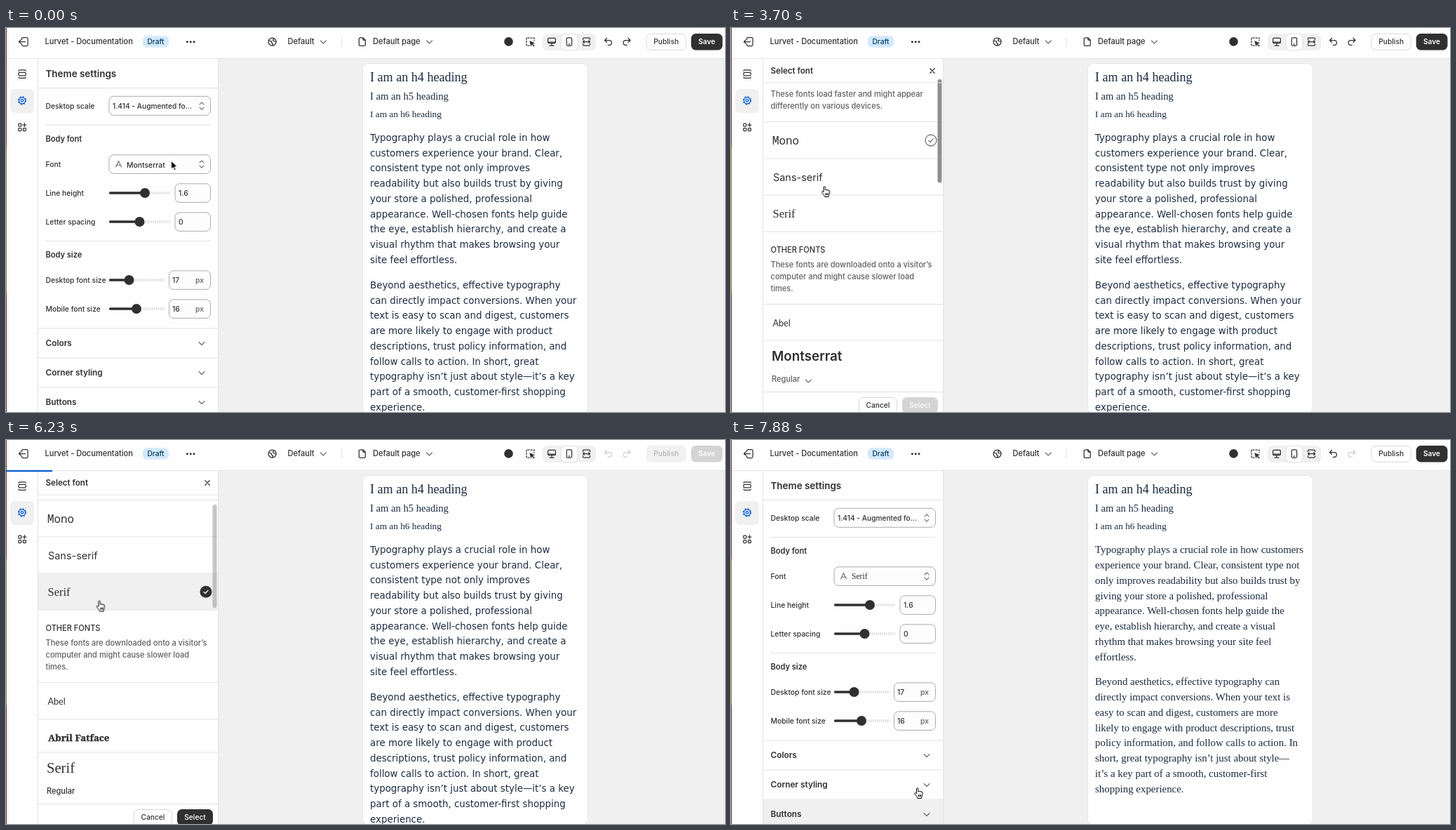
Write an HTML page that moves like this. It is 1025 by 547 pixels and loops after 8000 ms.

```html
<!DOCTYPE html>
<html lang="en">
<head>
<meta charset="utf-8">
<title>Theme editor</title>
<style>
html, body { margin: 0; width: 100%; height: 100%; overflow: hidden; background: #fff; }
svg { display: block; width: 1025px; height: 547px; }
text { font: 450 11.05px Inter, sans-serif; fill: #303030; white-space: pre; }
.label { font-size: 10.35px; }
.small { font-size: 10.2px; font-weight: 500; }
.btn { font-size: 10.2px; font-weight: 550; text-anchor: middle; }
.bold { font-weight: 600; }
.row { font-size: 11.8px; font-weight: 600; }
.title { font-size: 13.45px; font-weight: 600; }
.mid { font-weight: 500; }
.sub { fill: #616161; }
.serif { font-family: "Liberation Serif", serif; font-weight: 400; }
.page text { fill: #1d2c40; }
.body { font: 13.4px "DejaVu Sans", sans-serif; }
.body.serif { font: 14.9px "Liberation Serif", serif; }
.icon { fill: none; stroke: #303030; stroke-width: 1.25; stroke-linecap: round; stroke-linejoin: round; }
.chev { stroke: #6a6a6a; stroke-width: 1.1; }
.field { fill: #fdfdfd; stroke: #a3a3a3; stroke-width: .9; }
.line { stroke: #e3e3e3; stroke-width: 1; }
.track { stroke: #dadada; stroke-width: 4; stroke-dasharray: 1.3 1.5; }
.fill { stroke: #303030; stroke-width: 3.4; stroke-linecap: round; }
.knob { fill: #303030; }

/* hard changes */
.cut { animation: 8s step-end infinite; }
.settings { animation-name: settings; }
.picker { animation-name: picker; }
.before { animation-name: before; }
.chosen { animation-name: chosen; }
.busy { animation-name: busy; }
.undo { animation-name: undo; }
.redo { animation-name: redo; }
.old { animation-name: old; }
.new { animation-name: new; }
.pageBar { animation-name: pageBar; }
.press { animation-name: press; }
.hover { animation-name: hover; }
.monoTick { animation-name: monoTick; }
.serifTick { animation-name: serifTick; }
.arrow { animation-name: arrow; }
.hand { animation-name: hand; }
.wasFont { animation-name: wasFont; }
.nowFont { animation-name: nowFont; }
@keyframes settings { 0% { opacity: 1 } 14.75% { opacity: 0 } 92.875% { opacity: 1 } }
@keyframes picker { 0% { opacity: 0 } 14.75% { opacity: 1 } 92.875% { opacity: 0 } }
@keyframes before { 0% { opacity: 1 } 68.5% { opacity: 0 } }
@keyframes chosen { 0% { opacity: 0 } 68.5% { opacity: 1 } }
@keyframes busy { 0% { opacity: 0 } 70.375% { opacity: 1 } 96.625% { opacity: 0 } }
@keyframes undo { 0% { stroke: #303030 } 70.375% { stroke: #cfcfcf } 96.625% { stroke: #303030 } }
@keyframes redo { 0% { stroke: #303030 } 70.375% { stroke: #cfcfcf } }
@keyframes old { 0% { opacity: 1 } 85.375% { opacity: 0 } }
@keyframes new { 0% { opacity: 0 } 85.375% { opacity: 1 } }
@keyframes pageBar { 0% { opacity: 0 } 85.375% { opacity: 1 } 94.7% { opacity: 0 } }
@keyframes press { 0% { fill: #303030 } 87.25% { fill: #1a1a1a } }
@keyframes hover { 0% { opacity: 0 } 92.875% { opacity: 1 } }
@keyframes monoTick { 0% { opacity: 0 } 27.625% { opacity: 1 } 53.6% { opacity: 0 } }
@keyframes serifTick { 0% { opacity: 0 } 53.6% { opacity: 1 } 68.5% { opacity: 0 } }
@keyframes arrow { 0% { opacity: 1 } 3.625% { opacity: 0 } 20.25% { opacity: 1 } 25.85% { opacity: 0 } }
@keyframes hand { 0% { opacity: 0 } 3.625% { opacity: 1 } 20.25% { opacity: 0 } 25.85% { opacity: 1 } }
@keyframes wasFont { 0% { opacity: 1 } 50% { opacity: 0 } }
@keyframes nowFont { 0% { opacity: 0 } 50% { opacity: 1 } }

/* motion, about seven poses a second */
.cursor { animation: cursor 8s linear infinite; }
@keyframes cursor {
  0% { transform: translate(234.5px, 188px) }
  1.75% { transform: translate(234.5px, 188px); animation-timing-function: steps(6, start) }
  12.8%, 24% { transform: translate(198px, 180px); animation-timing-function: steps(4, start) }
  31.3% { transform: translate(128.5px, 225px) }
  51.75% { transform: translate(128.5px, 225px); animation-timing-function: steps(3, start) }
  57.25%, 59.25% { transform: translate(128px, 234.5px); animation-timing-function: steps(4, start) }
  66.56%, 79.75% { transform: translate(128.5px, 228.5px); animation-timing-function: steps(5, start) }
  89%, 94.75% { transform: translate(265px, 534px); animation-timing-function: steps(3, start) }
  100% { transform: translate(261px, 495px) }
}
.list { animation: list 8s linear infinite; }
@keyframes list {
  0% { transform: translateY(0) }
  42.625% { transform: translateY(0); animation-timing-function: steps(3, start) }
  48.05% { transform: translateY(-75px); animation-timing-function: steps(3, start) }
  53.5%, 59.25% { transform: translateY(-102.5px); animation-timing-function: steps(4, start) }
  66.56%, 100% { transform: translateY(-123px) }
}
.thumb { animation: thumb 8s linear infinite, fade 8s linear infinite; }
@keyframes thumb {
  0% { transform: translateY(0) }
  42.625% { transform: translateY(0); animation-timing-function: steps(3, start) }
  48.05% { transform: translateY(29px); animation-timing-function: steps(3, start) }
  53.5%, 59.25% { transform: translateY(40px); animation-timing-function: steps(4, start) }
  66.56%, 100% { transform: translateY(48px) }
}
@keyframes fade { 0%, 42.6% { opacity: 0 } 42.625%, 75% { opacity: 1 } 77.875% { opacity: .5 } 80%, 100% { opacity: 0 } }
.reveal { animation: reveal 8s linear infinite; }
@keyframes reveal {
  0%, 85.37% { opacity: 1; transform: translateY(0) }
  85.375% { opacity: 0; transform: translateY(15px); animation-timing-function: steps(5, start) }
  94.7%, 100% { opacity: 1; transform: translateY(0) }
}
.load { transform-origin: 1px 0; animation: load 8s linear infinite, done 8s linear infinite; }
@keyframes load {
  0% { transform: scaleX(0) }
  74.125% { transform: scaleX(0); animation-timing-function: steps(3, start) }
  79.7% { transform: scaleX(.0635); animation-timing-function: steps(4, start) }
  87.2% { transform: scaleX(.25) }
  87.25%, 100% { transform: scaleX(1) }
}
@keyframes done { 0%, 87.25% { opacity: 1 } 91% { opacity: .2 } 92.5%, 100% { opacity: 0 } }
</style>
</head>
<body>
<svg viewBox="0 0 1025 547" xmlns="http://www.w3.org/2000/svg">
<defs>
  <clipPath id="listClip"><rect x="46" y="78" width="256" height="367"/></clipPath>
  <linearGradient id="edge" x2="0" y2="1">
    <stop offset=".3" stop-color="#74382c"/><stop offset=".32" stop-color="#8a8632"/>
    <stop offset=".68" stop-color="#8a8632"/><stop offset=".7" stop-color="#6a3428"/>
  </linearGradient>
  <path id="down" class="icon chev" d="M-4-2l4 4 4-4"/>
  <path id="updown" class="icon chev" d="M-3-2.2l3-3 3 3M-3 2.2l3 3 3-3"/>
  <g id="tick"><circle r="8" fill="#fff" stroke="#757575" stroke-width="1.3"/><path class="icon" style="stroke:#757575" d="M-3.2.2l2.2 2.3 4.2-4.6"/></g>
</defs>

<rect width="1025" height="547" fill="#fefefe"/>
<rect x="302" y="44" width="723" height="503" fill="#f0f0f0"/>

<!-- preview -->
<g class="page">
  <rect x="508.5" y="50.5" width="321" height="498" rx="8" fill="#fefefe" stroke="#e6e6e6"/>
  <g class="reveal">
    <text class="serif" x="519" y="75.5" style="font-size:18.1px">I am an h4 heading</text>
    <text class="serif" x="519" y="102.3" style="font-size:14.6px">I am an h5 heading</text>
    <text class="serif" x="519" y="126.7" style="font-size:13.3px">I am an h6 heading</text>
    <g class="cut old">
      <text class="body" y="160.9"><tspan x="519">Typography plays a crucial role in how</tspan><tspan x="519" dy="21.76">customers experience your brand. Clear,</tspan><tspan x="519" dy="21.76">consistent type not only improves</tspan><tspan x="519" dy="21.76">readability but also builds trust by giving</tspan><tspan x="519" dy="21.76">your store a polished, professional</tspan><tspan x="519" dy="21.76">appearance. Well-chosen fonts help guide</tspan><tspan x="519" dy="21.76">the eye, establish hierarchy, and create a</tspan><tspan x="519" dy="21.76">visual rhythm that makes browsing your</tspan><tspan x="519" dy="21.76">site feel effortless.</tspan></text>
      <text class="body" y="370.9"><tspan x="519">Beyond aesthetics, effective typography</tspan><tspan x="519" dy="21.76">can directly impact conversions. When your</tspan><tspan x="519" dy="21.76">text is easy to scan and digest, customers</tspan><tspan x="519" dy="21.76">are more likely to engage with product</tspan><tspan x="519" dy="21.76">descriptions, trust policy information, and</tspan><tspan x="519" dy="21.76">follow calls to action. In short, great</tspan><tspan x="519" dy="21.76">typography isn’t just about style—it’s a key</tspan><tspan x="519" dy="21.76">part of a smooth, customer-first shopping</tspan><tspan x="519" dy="21.76">experience.</tspan></text>
    </g>
    <g class="cut new">
      <text class="body serif" y="161.3"><tspan x="519">Typography plays a crucial role in how customers</tspan><tspan x="519" dy="21.76">experience your brand. Clear, consistent type not</tspan><tspan x="519" dy="21.76">only improves readability but also builds trust by</tspan><tspan x="519" dy="21.76">giving your store a polished, professional</tspan><tspan x="519" dy="21.76">appearance. Well-chosen fonts help guide the</tspan><tspan x="519" dy="21.76">eye, establish hierarchy, and create a visual</tspan><tspan x="519" dy="21.76">rhythm that makes browsing your site feel</tspan><tspan x="519" dy="21.76">effortless.</tspan></text>
      <text class="body serif" y="349.3"><tspan x="519">Beyond aesthetics, effective typography can</tspan><tspan x="519" dy="21.76">directly impact conversions. When your text is</tspan><tspan x="519" dy="21.76">easy to scan and digest, customers are more</tspan><tspan x="519" dy="21.76">likely to engage with product descriptions, trust</tspan><tspan x="519" dy="21.76">policy information, and follow calls to action. In</tspan><tspan x="519" dy="21.76">short, great typography isn’t just about style—</tspan><tspan x="519" dy="21.76">it’s a key part of a smooth, customer-first</tspan><tspan x="519" dy="21.76">shopping experience.</tspan></text>
    </g>
  </g>
  <rect class="cut pageBar" x="822" y="151" width="6" height="155" rx="3" fill="#8f8f8f"/>
</g>

<!-- settings panel -->
<g class="cut settings">
  <text class="title" x="56.5" y="69.8">Theme settings</text>
  <path class="line" d="M46 85.5h256M56 138.5h236M56 303.5h236M46 428h256M46 470h256M46 512h256"/>
  <rect class="cut hover" x="46" y="512" width="256" height="35" fill="#f0f0f0"/>
  <text class="label" x="56.5" y="114.8">Desktop scale</text>
  <rect class="field" x="147" y="97.3" width="144.5" height="27" rx="6.5"/>
  <text class="small" x="152" y="114.8">1.414 - Augmented fo...</text>
  <use href="#updown" x="279" y="111"/>

  <text class="bold" x="56.5" y="162">Body font</text>
  <text class="label" x="56.5" y="197.8">Font</text>
  <rect class="field" x="147" y="180.8" width="144.5" height="26.6" rx="6.5"/>
  <path class="icon chev" d="M156.5 198l4-8.5 4 8.5M157.8 195.2h5.4"/>
  <text class="cut wasFont" x="172" y="198.5" style="font-size:10.4px;font-weight:550">Montserrat</text>
  <text class="serif cut nowFont" x="172" y="198.2" style="font-size:11.6px">Serif</text>
  <use href="#updown" x="279" y="194"/>

  <text class="label" x="56.5" y="238.8">Line height</text>
  <path class="track" d="M198 235h36"/><path class="fill" d="M148.5 235h50"/><circle class="knob" cx="198" cy="235" r="7"/>
  <rect class="field" x="241" y="221.8" width="50.5" height="26.6" rx="6.5"/>
  <text class="label" x="246" y="238.8">1.6</text>
  <text class="label" x="56.5" y="279.8">Letter spacing</text>
  <path class="track" d="M190 276h44"/><path class="fill" d="M148.5 276h42"/><circle class="knob" cx="190.5" cy="276" r="7"/>
  <rect class="field" x="241" y="262.8" width="50.5" height="26.6" rx="6.5"/>
  <text class="label" x="246" y="279.8">0</text>

  <text class="bold" x="56.5" y="327">Body size</text>
  <text class="label" x="56.5" y="362.8">Desktop font size</text>
  <path class="track" d="M175 359h51"/><path class="fill" d="M148.5 359h27"/><circle class="knob" cx="175.5" cy="359" r="7"/>
  <rect class="field" x="232.5" y="345.8" width="59" height="26.6" rx="6.5"/>
  <text class="label" x="237" y="362.8">17</text><text class="label sub" x="270" y="362.8">px</text>
  <text class="label" x="56.5" y="403.8">Mobile font size</text>
  <path class="track" d="M186 400h40"/><path class="fill" d="M148.5 400h38"/><circle class="knob" cx="186" cy="400" r="7"/>
  <rect class="field" x="232.5" y="386.8" width="59" height="26.6" rx="6.5"/>
  <text class="label" x="237" y="403.8">16</text><text class="label sub" x="270" y="403.8">px</text>

  <text class="row" x="56.5" y="453.2">Colors</text><use href="#down" x="279" y="449.5"/>
  <text class="row" x="56.5" y="495.2">Corner styling</text><use href="#down" x="279" y="491.5"/>
  <text class="row" x="56.5" y="537.2">Buttons</text><use href="#down" x="279" y="533.5"/>
</g>

<!-- font picker -->
<g class="cut picker">
  <g clip-path="url(#listClip)"><g class="list">
    <rect class="field" x="56.5" y="92.8" width="235" height="26.4" rx="6.5"/>
    <g class="icon chev"><circle cx="70.3" cy="105" r="4"/><path d="M73.4 108.2l3 3"/></g>
    <text class="sub" x="84" y="110">Search</text>
    <text class="mid" x="56.5" y="152.8">SYSTEM FONTS</text>
    <text class="sub" x="56.5" y="173">These fonts load faster and might appear</text>
    <text class="sub" x="56.5" y="190">differently on various devices.</text>
    <rect class="cut chosen" x="46" y="313" width="256" height="52" fill="#f0f0f0"/>
    <path class="line" d="M46 208.5h256M46 261h256M46 313h256M46 365h256M46 468.5h256M46 520.5h256"/>
    <text x="59" y="240.8" style="font:15.8px 'Noto Sans Mono',monospace">Mono</text>
    <text x="60" y="293" style="font-size:14.45px;font-weight:400">Sans-serif</text>
    <text class="serif" x="59.5" y="345" style="font-size:16.5px">Serif</text>
    <use class="cut monoTick" href="#tick" x="285" y="235"/>
    <use class="cut serifTick" href="#tick" x="285" y="339.5"/>
    <g class="cut chosen"><circle class="knob" cx="285" cy="339.2" r="8.5"/><path class="icon" style="stroke:#fff" d="M282 339.4l2.1 2.1 3.9-4.2"/></g>
    <text class="mid" x="56.5" y="395">OTHER FONTS</text>
    <text class="sub" x="56.5" y="415.8">These fonts are downloaded onto a visitor’s</text>
    <text class="sub" x="56.5" y="432.8">computer and might cause slower load</text>
    <text class="sub" x="56.5" y="449.8">times.</text>
    <text x="59.5" y="500" style="font:12.6px Lato,sans-serif">Abel</text>
    <text x="60" y="552.3" style="font:900 13.3px 'Noto Serif',serif;stroke:#303030;stroke-width:.4px">Abril Fatface</text>
  </g></g>
  <rect class="thumb" x="294.5" y="44" width="6" height="147.5" rx="3" fill="#8f8f8f"/>
  <text x="56.5" y="65" style="font-size:11.6px;font-weight:600">Select font</text>
  <path class="icon" d="M283.8 57.8l6.4 6.4M290.2 57.8l-6.4 6.4"/>
  <path class="line" d="M46 78h256M46 445h256M46 518.5h256"/>
  <g class="cut before">
    <text x="58" y="474" style="font-size:18.8px;font-weight:600">Montserrat</text>
    <text class="sub" x="58" y="504.2">Regular</text>
    <use href="#down" x="110.3" y="503"/>
    <rect x="244" y="526" width="51" height="23" rx="6.5" fill="#d4d4d4"/>
    <text class="btn" x="269.5" y="541.3" style="fill:#fafafa">Select</text>
  </g>
  <g class="cut chosen">
    <text class="serif" x="58" y="473.5" style="font-size:20.6px">Serif</text>
    <text x="58" y="504.2">Regular</text>
    <rect class="cut press" x="244" y="526" width="51" height="23" rx="6.5"/>
    <text class="btn" x="269.5" y="541.3" style="fill:#fff">Select</text>
  </g>
  <rect x="182.5" y="526.5" width="54" height="23" rx="6.5" fill="#fff" stroke="#d6d6d6"/>
  <text class="btn" x="209.5" y="541.3">Cancel</text>
</g>

<!-- side rail -->
<path class="line" d="M45.5 44v503M302.5 44v503"/>
<rect x="6" y="87" width="34" height="34" rx="6.5" fill="#f0f0f0"/>
<g class="icon">
  <rect x="18" y="63.3" width="10.2" height="4.6" rx="1.2"/>
  <path d="M18 61.2q0-1.4 1.5-1.4h7.2q1.5 0 1.5 1.4M18 70q0 1.4 1.5 1.4h7.2q1.5 0 1.5-1.4"/>
  <rect x="17.8" y="136" width="4" height="4" rx="1"/><rect x="17.8" y="142.6" width="4" height="4" rx="1"/>
  <rect x="24.4" y="142.6" width="4" height="4" rx="1"/><path d="M26.4 135.6v4.8M24 138h4.8"/>
</g>
<g class="icon" style="stroke:#005bd3">
  <circle cx="23" cy="103.3" r="1.8"/><circle cx="23" cy="103.3" r="4.5"/>
  <circle cx="23" cy="103.3" r="5.4" stroke-dasharray="2.12" stroke-width="1.5" stroke-linecap="butt"/>
</g>

<!-- top bar -->
<path class="line" d="M1 43.5h1024"/>
<rect class="load" x="1" y="43" width="1024" height="2.2" fill="#005bd3"/>
<path class="icon" d="M22.5 16.5v-1.2q0-1.8 1.8-1.8h5q1.8 0 1.8 1.8v8.4q0 1.8-1.8 1.8h-5q-1.8 0-1.8-1.8v-1.2M27.5 19.5h-9M21 17l-2.5 2.5 2.5 2.5"/>
<text class="mid" x="55.5" y="23.2">Lurvet - Documentation</text>
<rect x="195" y="11.3" width="37" height="16.4" rx="6" fill="#d3e9fd"/>
<text class="btn" x="213.5" y="23.2" style="fill:#003a5a">Draft</text>
<g class="knob"><circle cx="258.4" cy="19.7" r="1.5"/><circle cx="263.2" cy="19.7" r="1.5"/><circle cx="268" cy="19.7" r="1.5"/></g>
<g class="icon"><circle cx="379.6" cy="19.6" r="5.5"/><path d="M374.6 18l4 1.2v2l2 1-.8 2.6M382 14.8l-1.6 2.4 1.6 1.8 3 .2"/></g>
<text class="mid" x="401.5" y="23.4">Default</text><use href="#down" x="452.3" y="20"/>
<path class="line" d="M478.5 13v13.5"/>
<path class="icon" d="M508.8 13.8h-3.6q-1.9 0-1.9 1.9v7.8q0 1.9 1.9 1.9h5.2q1.9 0 1.9-1.9v-6.2zv2q0 1.6 1.6 1.6h1.9"/>
<text class="mid" x="523" y="23.4">Default page</text><use href="#down" x="603.5" y="20"/>
<circle class="knob" cx="716.5" cy="19.4" r="6.3"/>
<path class="icon" stroke-dasharray="2.2 2" d="M746 25h-4V14h11v4"/>
<path class="knob" d="M746.2 18.2l8 3-3.4 1.2 3 3-1.2 1.2-3-3-1.2 3.2z"/>
<rect x="765" y="8" width="76" height="24" rx="6.5" fill="#f0f0f0"/>
<rect x="791" y="8.3" width="24" height="23.4" rx="6" fill="#fff" stroke="#dedede"/>
<g class="icon">
  <rect x="772.6" y="14.3" width="10.8" height="7.4" rx="1.5"/><path d="M772.8 20h10.4M778 22v2.5M775 25h6"/>
  <rect x="799.2" y="13.8" width="7.4" height="11.6" rx="1.8"/><path d="M802 23.2h1.8"/>
  <path d="M822.5 16.8v-1.4q0-1.2 1.2-1.2h7.6q1.2 0 1.2 1.2v1.4M822.5 22.6v1.2q0 1.2 1.2 1.2h7.6q1.2 0 1.2-1.2v-1.2M822.6 19.7h9.8M824.3 18l-1.8 1.7 1.8 1.7M830.7 18l1.8 1.7-1.8 1.7"/>
</g>
<path class="icon cut undo" d="M856.5 14.5l-3 3 3 3M853.8 17.5h6.2a3.3 3.3 0 0 1 0 6.8h-1.8"/>
<path class="icon cut redo" d="M887 14.5l3 3-3 3M889.7 17.5h-6.2a3.3 3.3 0 0 0 0 6.8h1.8"/>
<rect x="913" y="8.3" width="56.5" height="23" rx="6.5" fill="#fff" stroke="#d9d9d9"/>
<text class="btn" x="941.2" y="23.2">Publish</text>
<rect x="976.7" y="8" width="44.8" height="23.5" rx="6.5" fill="#303030"/>
<text class="btn bold" x="999" y="23.2" style="fill:#fff">Save</text>
<g class="cut busy">
  <rect x="912" y="7" width="111" height="26" fill="#fefefe"/>
  <rect x="912.8" y="8" width="57" height="23.5" rx="6.5" fill="#f1f1f1"/>
  <text class="btn" x="941.2" y="23.2" style="fill:#b5b5b5">Publish</text>
  <rect x="976.7" y="8" width="44.8" height="23.5" rx="6.5" fill="#d4d4d4"/>
  <text class="btn bold" x="999" y="23.2" style="fill:#fff">Save</text>
</g>
<rect width="1" height="547" fill="url(#edge)"/>

<g class="cursor">
  <path class="cut arrow" fill="#000" stroke="#fff" stroke-width="1" d="M1 1v12.2l2.8-2.6 1.9 4.3 2-.9-1.9-4.2h3.9z"/>
  <path class="cut hand" fill="#fff" stroke="#000" stroke-width="1" stroke-linejoin="round" d="M3.5 8.6V1.9a1.2 1.2 0 0 1 2.4 0V6a1.1 1.1 0 0 1 2.1.2 1 1 0 0 1 2 .4 .9 .9 0 0 1 1.8.5v3.4c0 1.6-.9 2.6-1.2 3.6v1.4H5v-1.2C3.8 12.8 2 11 .9 9.2c-.6-1 .6-1.9 1.4-1.2zM6.4 10.2v3M8 10.2v3M9.5 10.2v3"/>
</g>
</svg>
</body>
</html>
```
